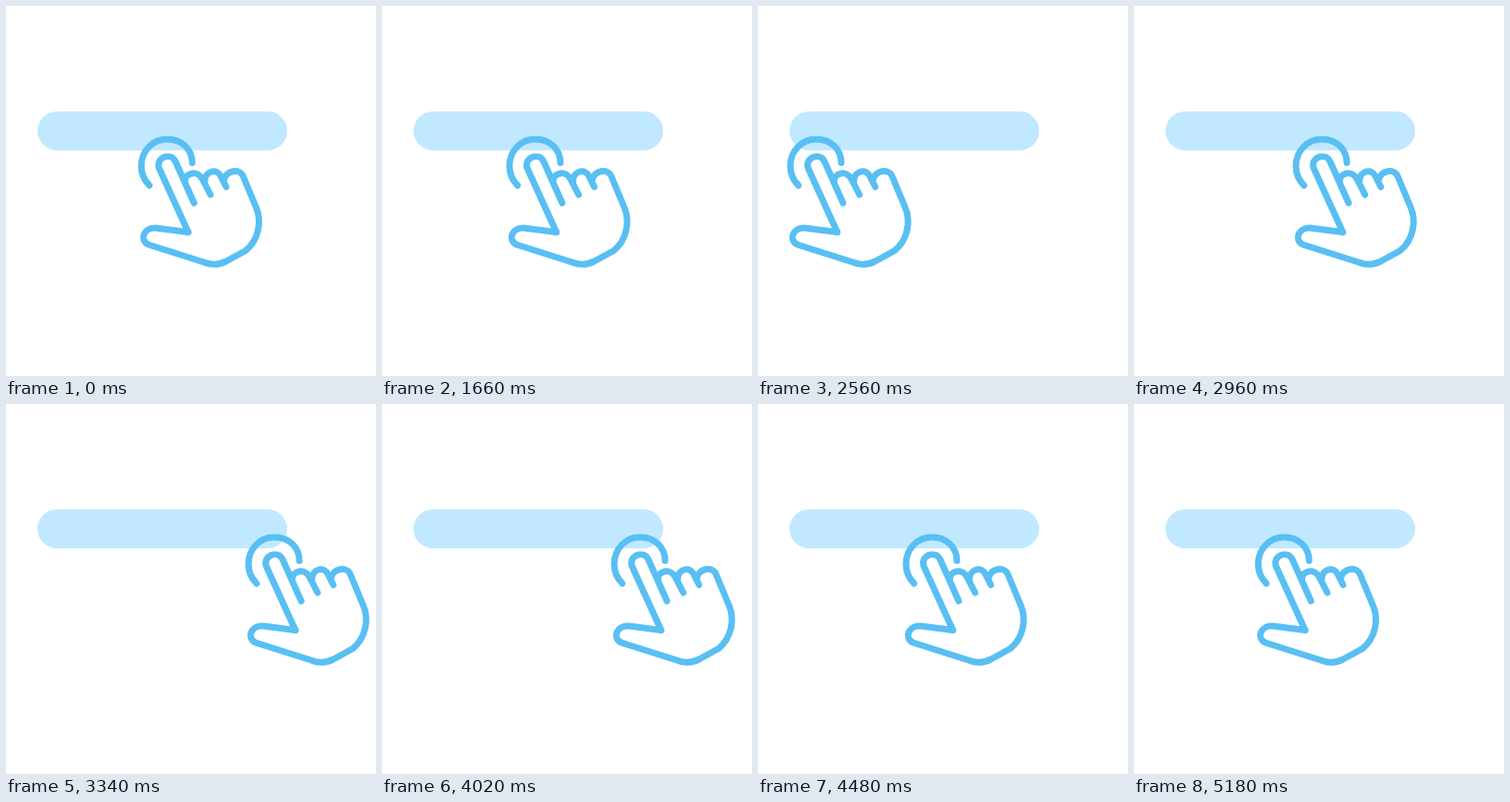
These frames come from a looping animation (400 px wide and 400 px high, 6.24 s). An HTML page with a canvas:

```html
<!DOCTYPE html>
<html lang="en">
<head>
<meta charset="utf-8">
<title>Swipe hint</title>
<style>
html, body { margin: 0; width: 100%; height: 100%; overflow: hidden; background: #fff; }
canvas { display: block; width: 100vw; height: 100vh; }
</style>
</head>
<body>
<canvas id="stage" width="400" height="400"></canvas>
<script>
const ctx = document.getElementById('stage').getContext('2d');
const LOOP = 6240;
const STEP = 20;
const REST = 1660;   // the loop opens on a pause in mid-swipe
const REACH = 116;
const END = -12;

const hand = [
  // touch ring
  'M155 194C149.5 188.5 146.3 181 146.3 173C146.3 156.6 158.6 144 174.3 144C190 144 201.3 155 201.3 169.5',
  // index finger
  'M197 244.5L165.8 176C160.6 164.2 178.2 157 183.4 168.5L203.3 213',
  // knuckles
  'M193.5 189C194 180 207.5 177 212.5 187.5L221 204',
  'M215 189C215 178 228.5 175 232.5 184.5L238 195.5',
  // last finger, palm and thumb
  'M236 187C238 178 252.5 175 256.3 184L270.3 217.5C277 233 273 253 259 264.5L238 276C230 280 222 280.5 214 277' +
  'L154 258C143 252 150 239 162 240L197 244.5'
].map(d => new Path2D(d));

// Slow start, fast middle, long soft landing.
const ease = u => 1 - (1 - u ** 2.8) ** 5.3;

function swipe(t, start, duration, from, to) {
  const u = Math.min(1, Math.max(0, (t - start) / duration));
  return from + (to - from) * ease(u);
}

function offsetAt(t) {
  if (t < REST) return 0;
  if (t < 2420) return swipe(t, 1073, 1200, REACH, -REACH);
  if (t < 3740) return swipe(t, 2420, 1020, -REACH, REACH);
  return swipe(t, 3740, 1195, REACH, END);
}

function draw(t) {
  ctx.fillStyle = '#fff';
  ctx.fillRect(0, 0, 400, 400);

  ctx.fillStyle = '#c0e9ff';
  ctx.beginPath();
  ctx.roundRect(34, 114, 270, 42, 21);
  ctx.fill();

  ctx.save();
  ctx.translate(offsetAt(t), 0);
  ctx.strokeStyle = '#59bff3';
  ctx.lineWidth = 7;
  ctx.lineCap = ctx.lineJoin = 'round';
  hand.forEach(path => ctx.stroke(path));
  ctx.restore();
}

const start = performance.now();
function tick() {
  const t = (performance.now() - start) % LOOP;
  draw(Math.floor(t / STEP) * STEP);
  requestAnimationFrame(tick);
}
tick();
</script>
</body>
</html>
```
